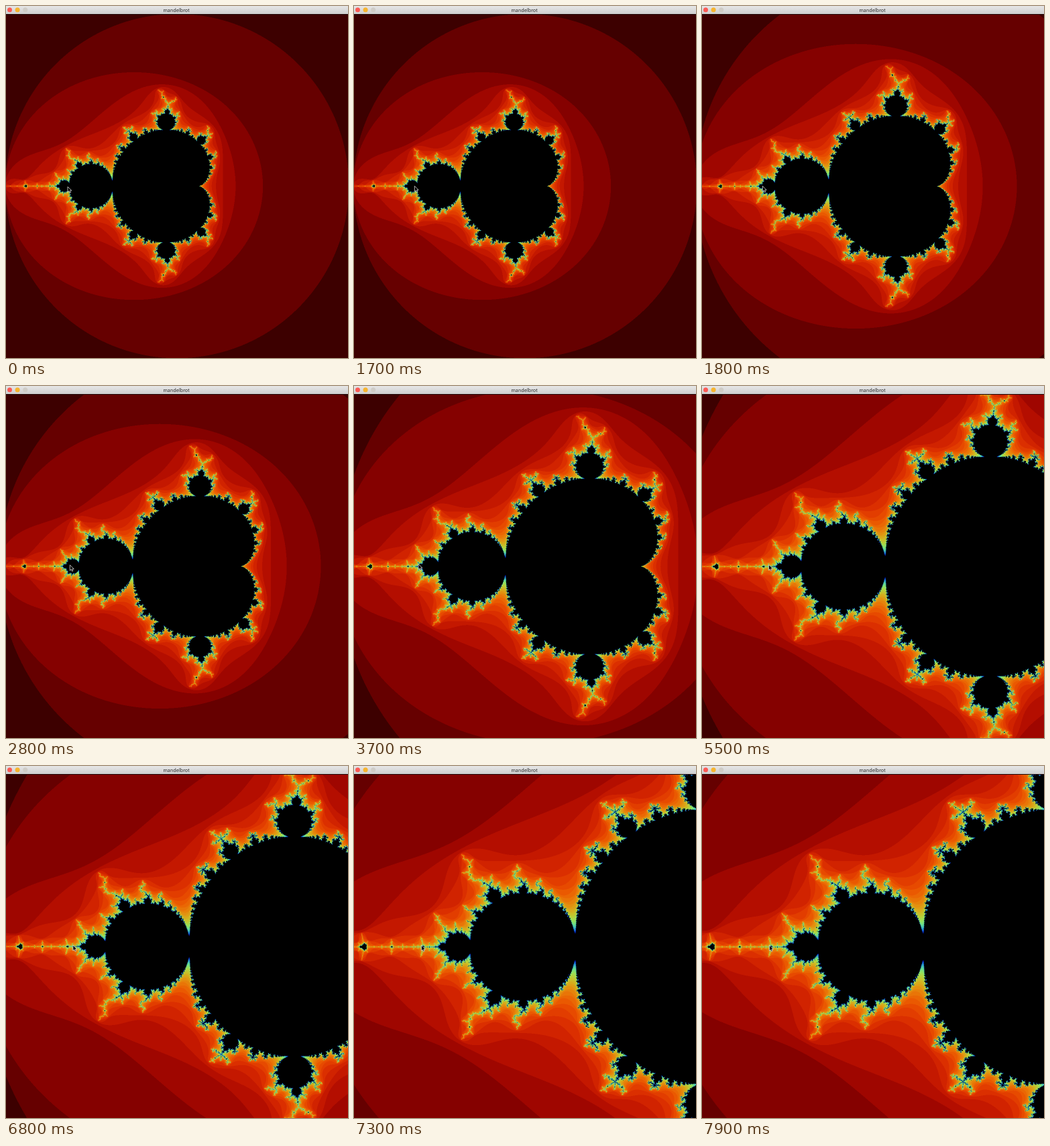
An HTML page with a canvas that plays this animation: 510x526 px, repeating every 8000 ms.

```html
<!DOCTYPE html>
<html lang="en">
<head>
<meta charset="utf-8">
<title>mandelbrot</title>
<style>
  html, body { margin: 0; width: 100%; height: 100%; overflow: hidden; background: #000; }
  canvas { display: block; }
</style>
</head>
<body>
<canvas id="stage" width="510" height="526"></canvas>
<script>
const LOOP = 8000, WIDTH = 510, HEIGHT = 526, BAR = 12;
const MAX_ITER = 50, SAMPLES = 2;
const ctx = document.getElementById('stage').getContext('2d');

// Each view magnifies the plane by 1.25; x and y are the pixel of c = 0.
const SCALE_X = 128.1, SCALE_Y = 128.6, ZOOM = 1.25;
const views = [
  { start: 0, x: 255, y: 269.1 },
  { start: 1800, x: 309.4, y: 269.4 },
  { start: 3700, x: 376.5, y: 269.6 },
  { start: 5500, x: 461.6, y: 269.8 },
  { start: 7300, x: 565.2, y: 270.2 }
];

// Pointer keys: time, x, y
const pointerKeys = [
  [0, 92, 270], [1100, 92, 270], [1200, 90.3, 269], [2100, 90.3, 269],
  [2800, 95.3, 267.5], [3600, 95.3, 267.5], [3700, 96, 266], [5000, 96, 266],
  [5300, 99.5, 267], [7200, 100, 268], [7300, 100.5, 268], [LOOP, 100.5, 268]
];

// Bernstein polynomial gradient with the slight crosstalk of a display profile
function colorOf(n) {
  const t = n / MAX_ITER, s = 1 - t;
  const r = 9 * s ** 3 * t;
  const g = 15 * s * s * t * t;
  const b = 8.5 * s * t ** 3;
  return [r ** 0.8 - 0.08 * g, g - 0.1 * r, b - 0.15 * g].map(v => 255 * v);
}
const palette = Array.from({ length: MAX_ITER + 1 }, (_, n) => colorOf(n));

function escapeTime(cx, cy) {
  // Skip the main cardioid and the period-2 disc.
  const q = (cx - 0.25) ** 2 + cy * cy;
  if (q * (q + cx - 0.25) < cy * cy / 4 || (cx + 1) ** 2 + cy * cy < 1 / 16) return MAX_ITER;
  let x = 0, y = 0, n = 0;
  while (n < MAX_ITER && x * x + y * y <= 4) {
    const next = x * x - y * y + cx;
    y = 2 * x * y + cy;
    x = next;
    n++;
  }
  return n;
}

function renderView(view, level) {
  const canvas = document.createElement('canvas');
  const w = canvas.width = WIDTH * SAMPLES;
  const h = canvas.height = (HEIGHT - BAR) * SAMPLES;
  const g = canvas.getContext('2d');
  const image = g.createImageData(w, h);
  const zoom = ZOOM ** level;
  for (let j = 0, k = 0; j < h; j++) {
    const cy = ((j + 0.5) / SAMPLES + BAR - view.y) / (SCALE_Y * zoom);
    for (let i = 0; i < w; i++, k += 4) {
      const cx = ((i + 0.5) / SAMPLES - view.x) / (SCALE_X * zoom);
      const [r, gr, b] = palette[escapeTime(cx, cy)];
      image.data[k] = r;
      image.data[k + 1] = gr;
      image.data[k + 2] = b;
      image.data[k + 3] = 255;
    }
  }
  g.putImageData(image, 0, 0);
  return canvas;
}
views.forEach((view, level) => { view.canvas = renderView(view, level); });

function drawTitleBar() {
  const shade = ctx.createLinearGradient(0, 0, 0, BAR);
  shade.addColorStop(0, '#e6e6e6');
  shade.addColorStop(1, '#cfcfcf');
  ctx.fillStyle = shade;
  ctx.fillRect(0, 0, WIDTH, BAR);
  ctx.fillStyle = '#1c0404';
  ctx.fillRect(0, BAR, WIDTH, 1);
  ['#fb5a55', '#f6b42f', '#cfccc6'].forEach((color, i) => {
    ctx.fillStyle = color;
    ctx.beginPath();
    ctx.arc(5.5 + 11.6 * i, 5.8, 3.5, 0, 7);
    ctx.fill();
  });
  ctx.fillStyle = '#333';
  ctx.font = '7.3px Inter, sans-serif';
  ctx.textAlign = 'center';
  ctx.fillText('mandelbrot', 254, 8.6);
}

function pointerAt(time) {
  const i = pointerKeys.findIndex(key => key[0] > time);
  const [t0, x0, y0] = pointerKeys[i - 1], [t1, x1, y1] = pointerKeys[i];
  const p = (time - t0) / (t1 - t0);
  return [x0 + (x1 - x0) * p, y0 + (y1 - y0) * p];
}

const arrow = new Path2D('M0 0V8.2L1.9 6.5L3.1 9.3L4.6 8.7L3.4 5.9H6Z');

function draw(time) {
  const view = views.findLast(v => v.start <= time);
  ctx.imageSmoothingQuality = 'high';
  ctx.drawImage(view.canvas, 0, BAR, WIDTH, HEIGHT - BAR);
  drawTitleBar();
  ctx.save();
  ctx.translate(...pointerAt(time));
  ctx.fillStyle = '#000';
  ctx.strokeStyle = '#ddd';
  ctx.lineWidth = 0.8;
  ctx.fill(arrow);
  ctx.stroke(arrow);
  ctx.restore();
}

function tick() {
  // The picture advances in steps of 100 ms.
  draw(Math.floor(performance.now() % LOOP / 100) * 100);
  requestAnimationFrame(tick);
}
tick();
</script>
</body>
</html>
```
